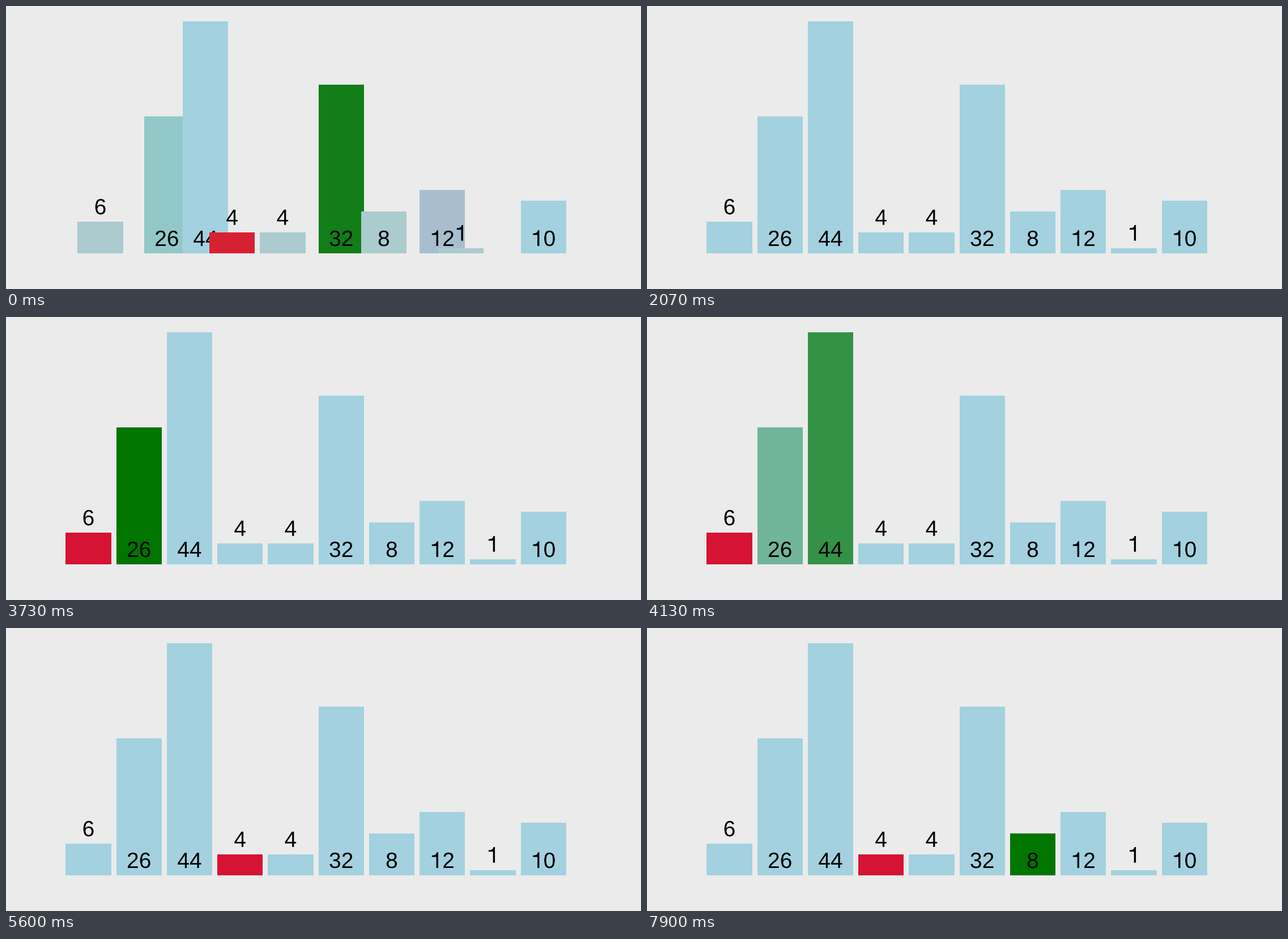
Recreate the animation shown at these times as a matplotlib script. Size 1121 px wide and 500 px high, loop 8 s.

```python
import numpy as np
import matplotlib.pyplot as plt
from matplotlib.animation import FuncAnimation
from matplotlib.patches import PathPatch, Rectangle
from matplotlib.path import Path
from matplotlib.textpath import TextPath
from matplotlib.transforms import Affine2D

W, H, DPI = 1121, 500, 100
LOOP, STEP = 8000, 25

VALUES = [6, 26, 44, 4, 4, 32, 8, 12, 1, 10]
OLD_SLOTS = [3, 8, 6, 1, 2, 5, 4, 7, 0, 9]
LEFT, PITCH, BAR_W = 105.3, 89.25, 80.3
BASE, UNIT = 437.4, 9.33
EM, ADVANCE = 39, 0.556


def rgb(r, g, b):
    return np.array([r, g, b]) / 255


BACK = rgb(235, 235, 235)
LIGHT = rgb(163, 209, 223)
GREEN = rgb(0, 117, 0)
RED = rgb(214, 19, 51)
ORANGE = rgb(237, 146, 55)

# Colours left over from the previous sort
OLD_COLORS = [ORANGE, GREEN, LIGHT, ORANGE, ORANGE,
              LIGHT, ORANGE, RED, ORANGE, LIGHT]

reset = {i: LIGHT for i in range(len(VALUES))}
reset.update({3: RED, 5: GREEN})

# (start ms, duration ms, {bar: colour})
EVENTS = [
    (-186, 300, reset),
    (170, 300, {3: LIGHT, 5: LIGHT}),
    (2645, 140, {0: RED}),
    (3305, 300, {1: GREEN}),
    (4004, 300, {1: LIGHT, 2: GREEN}),
    (4705, 300, {2: LIGHT, 3: GREEN}),
    (5380, 220, {0: LIGHT, 3: RED}),
    (6140, 300, {4: GREEN}),
    (6804, 300, {4: LIGHT, 5: GREEN}),
    (7505, 300, {5: LIGHT, 6: GREEN}),
]
MOVE_START, MOVE_TIME = -198, 300

# Cubic bezier (0.25, 0.1, 0.25, 1)
s = np.linspace(0, 1, 400)
EASE_X = 0.75 * s * (1 - s) + s**3
EASE_Y = 0.3 * s * (1 - s)**2 + 3 * s**2 * (1 - s) + s**3


def ease(t, start, duration):
    return np.interp((t - start) / duration, EASE_X, EASE_Y)


# A "1" without a foot, in em units
ONE = np.array([(.085, .50), (.285, .50), (.285, 0), (.372, 0), (.372, .709),
                (.305, .709), (.285, .645), (.235, .597), (.165, .574),
                (.085, .568), (.085, .50)])


def digit_path(ch):
    if ch == "1":
        return Path(ONE * EM, closed=True)
    return TextPath((0, 0), ch, size=EM, prop={"family": "Liberation Sans"})


def number_path(value):
    """Outline of a number, centred on x = 0 with the baseline at y = 0."""
    text = str(value)
    verts, codes = [], []
    for k, ch in enumerate(text):
        p = digit_path(ch)
        x = (k - len(text) / 2) * ADVANCE * EM
        verts.append((p.vertices + [x, 0]) * [1, -1])
        codes.append(p.codes)
    return Path(np.concatenate(verts), np.concatenate(codes))


fig = plt.figure(figsize=(W / DPI, H / DPI), dpi=DPI, facecolor=BACK)
ax = fig.add_axes([0, 0, 1, 1])
ax.set_xlim(0, W)
ax.set_ylim(H, 0)
ax.axis("off")

bars, labels = [], []
for i, value in enumerate(VALUES):
    height = value * UNIT
    bar = Rectangle((0, BASE - height), BAR_W, height, lw=0, zorder=2 * i)
    label = PathPatch(number_path(value), fc="black", lw=0, zorder=2 * i + 1)
    bars.append(ax.add_patch(bar))
    labels.append(ax.add_patch(label))


def bar_color(i, t):
    color = OLD_COLORS[i]
    for start, duration, targets in EVENTS:
        if i in targets and t > start:
            color = color + (targets[i] - color) * ease(t, start, duration)
    return np.clip(color, 0, 1)


def draw(frame):
    t = frame * STEP
    left = 1 - ease(t, MOVE_START, MOVE_TIME)
    for i, value in enumerate(VALUES):
        x = LEFT + PITCH * (i + (OLD_SLOTS[i] - i) * left)
        bars[i].set_x(x)
        bars[i].set_facecolor(bar_color(i, t))
        # Small values sit above their bar
        y = BASE - 13.4 - (value * UNIT if value < 8 else 0)
        shift = Affine2D().translate(x + BAR_W / 2, y)
        labels[i].set_transform(shift + ax.transData)
    return bars + labels


anim = FuncAnimation(fig, draw, frames=LOOP // STEP, interval=STEP,
                     repeat=True, repeat_delay=0)
plt.show()
```
